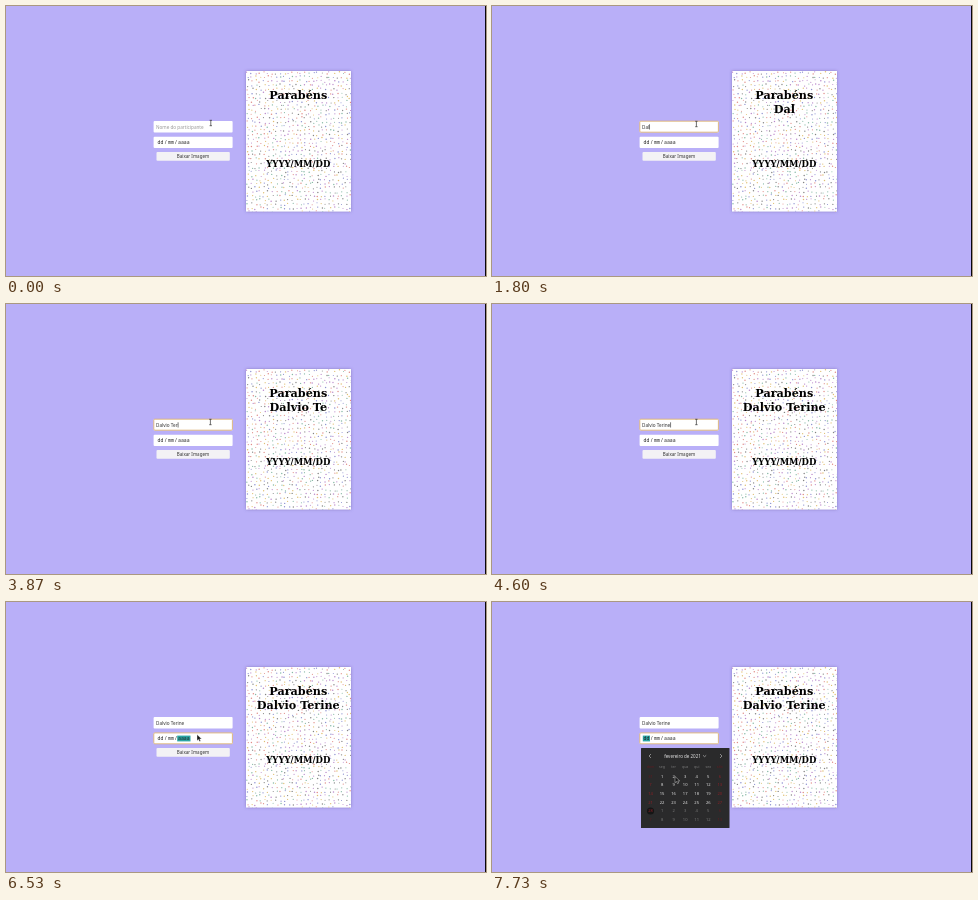
These frames come from a looping animation (480 by 270 pixels, 8000 ms). An HTML page:

```html
<!DOCTYPE html>
<html lang="pt-BR">
<head>
<meta charset="utf-8">
<title>Parabéns</title>
<style>
  html, body { margin: 0; width: 100%; height: 100%; overflow: hidden; background: #b9aff8; }
  svg { display: block; width: 480px; height: 270px; }
  text { font-family: "Noto Sans", "Open Sans", sans-serif; font-size: 4.65px; fill: #333; }
  .card text { font-family: "DejaVu Serif", serif; font-weight: bold; font-size: 11.2px; fill: #000; }
  .card .date { font-size: 8.5px; }
  .mid { text-anchor: middle; }
  .parts text { font-family: "Noto Sans Mono", monospace; font-size: 4.8px; fill: #222; }
  .focus { fill: none; stroke: #dbb274; stroke-width: .9; }
  .picker text { fill: #e4e4e4; font-size: 4.1px; }
  .picker .dim { fill: #777; }
  .picker .rest { fill: #8a2027; }
  .picker .faint { fill: #5c1c20; }
  .picker path { fill: none; stroke: #ccc; stroke-width: .6; }
</style>
</head>
<body>
<svg viewBox="0 0 480 270">
  <defs>
    <filter id="shade" x="-10%" y="-10%" width="120%" height="120%">
      <feDropShadow dx="0" dy="0" stdDeviation="1.8" flood-color="#554a90" flood-opacity=".5"/>
    </filter>
    <clipPath id="cardClip"><rect x="240" y="65" width="105" height="140.5"/></clipPath>
  </defs>
  <rect width="480" height="270" fill="#b9aff8"/>
  <rect x="479" width="1" height="270" fill="#08070c"/>

  <g class="card">
    <rect x="240" y="65" width="105" height="140.5" fill="#fff" filter="url(#shade)"/>
    <g id="confetti" clip-path="url(#cardClip)" opacity=".8"></g>
    <text class="mid" x="292.3" y="93">Parabéns</text>
    <text class="mid" x="292.3" y="107" id="cardName"></text>
    <text class="mid date" x="292.3" y="160.7">YYYY/MM/DD</text>
  </g>

  <rect x="147.6" y="115" width="79" height="11.4" rx="1" fill="#fff"/>
  <rect x="147.6" y="130.7" width="79" height="11.3" rx="1" fill="#fff"/>
  <rect x="150.5" y="146" width="73.3" height="8.7" rx="1" fill="#f3f2f5"/>
  <text class="mid" x="187" y="152.2" style="font-size:4.5px">Baixar Imagem</text>
  <rect class="focus" id="nameFocus" x="147.8" y="115.2" width="78.6" height="11" rx="1"/>
  <rect class="focus" id="dateFocus" x="147.8" y="130.9" width="78.6" height="10.9" rx="1"/>
  <text id="nameText" x="150" y="122.6"></text>
  <rect id="caret" y="118.3" width=".6" height="5.2" fill="#222"/>
  <rect id="segment" y="133.6" height="5.8" fill="#2aa5a3"/>
  <g class="parts">
    <text x="151.6" y="138.2">dd</text>
    <text x="158.2" y="138.2">/</text>
    <text x="162" y="138.2">mm</text>
    <text x="168.5" y="138.2">/</text>
    <text x="172.1" y="138.2">aaaa</text>
  </g>

  <g class="picker" id="picker">
    <rect x="149" y="146" width="88.5" height="80" rx=".6" fill="#2a2a2b"/>
    <text class="mid" x="190.5" y="155.5" style="font-size:4.5px">fevereiro de 2021</text>
    <path d="M159 152l-2 2 2 2M228 152l2 2-2 2M211 153.3l1.6 1.4 1.6-1.4"/>
    <circle cx="158.5" cy="209" r="3.6" fill="#151515"/>
  </g>

  <path id="beam" d="M-1.2-2.7h2.4M0-2.7v5.4M-1.2 2.7h2.4" fill="none" stroke="#333" stroke-width=".7"/>
  <path id="arrow" d="M0 0v6.2l1.5-1.3 1 2.2 1.2-.5-1-2.2h2z" fill="#111" stroke="#fff" stroke-width=".4"/>
</svg>
<script>
  const $ = id => document.getElementById(id);
  const NS = "http://www.w3.org/2000/svg";
  const LOOP = 8000, STEP = 200 / 3;
  const NAME = "Dalvio Terine";
  const KEY_TIMES = [1066, 1533, 1666, 2000, 2266, 2600, 3066, 3330, 3530, 3800, 4000, 4200, 4400];
  const CARD_LAG = 128;
  const FOCUS_NAME = 800, FOCUS_DATE = 5330, OPEN_PICKER = 6730;

  // time, x, y
  const POINTER = [
    [0, 204.8, 117], [400, 204.8, 117], [600, 204.4, 118], [4930, 204.4, 118],
    [5330, 179, 137], [5870, 179, 137], [6470, 191, 132.5],
    [6930, 191, 132.5], [7730, 183, 174.5]
  ];

  function add(parent, tag, attrs, text) {
    const el = document.createElementNS(NS, tag);
    for (const k in attrs) el.setAttribute(k, attrs[k]);
    if (text !== undefined) el.textContent = text;
    parent.append(el);
  }

  function drawConfetti() {
    let seed = 17;
    const rnd = () => (seed = (seed * 16807) % 2147483647) / 2147483647;
    const colors = ["#d8706a", "#d9b050", "#6aa890", "#6f74c4", "#a96bbd", "#666"];
    const gap = 4.1;
    for (let y = 65.5; y < 206; y += gap) {
      for (let x = 240.5; x < 346; x += gap) {
        add($("confetti"), "circle", {
          cx: (x + rnd() * 2.8).toFixed(2), cy: (y + rnd() * 2.8).toFixed(2),
          r: (.5 + rnd() * .25).toFixed(2), fill: colors[Math.floor(rnd() * 6)]
        });
      }
    }
  }

  function drawPicker() {
    const colX = i => 158.5 + i * 11.55;
    const weekend = i => i % 7 === 0 || i % 7 === 6;
    ["dom", "seg", "ter", "qua", "qui", "sex", "sáb"].forEach((d, i) =>
      add($("picker"), "text", {
        x: colX(i), y: 166.2, class: "mid " + (weekend(i) ? "faint" : "dim"), style: "font-size:3.6px"
      }, d));
    for (let i = 0; i < 42; i++) {
      const inside = i > 0 && i < 29;
      const day = i === 0 ? 31 : inside ? i : i - 28;
      const tone = weekend(i) ? (inside ? "rest" : "faint") : inside ? "" : "dim";
      add($("picker"), "text", {
        x: colX(i % 7), y: 175.5 + Math.floor(i / 7) * 8.7, class: "mid " + tone
      }, day);
    }
  }

  function pointerAt(t) {
    let i = 0;
    while (i < POINTER.length - 1 && POINTER[i + 1][0] <= t) i++;
    const a = POINTER[i], b = POINTER[i + 1];
    if (!b) return [a[1], a[2]];
    const p = (t - a[0]) / (b[0] - a[0]), e = p * p * (3 - 2 * p);
    return [a[1] + (b[1] - a[1]) * e, a[2] + (b[2] - a[2]) * e];
  }

  const show = (id, on) => { $(id).style.display = on ? "" : "none"; };
  const typed = t => NAME.slice(0, KEY_TIMES.filter(k => k <= t).length);

  function render(time) {
    const t = Math.floor((time % LOOP + 4) / STEP) * STEP;
    const value = typed(t), field = $("nameText");
    const inName = t >= FOCUS_NAME && t < FOCUS_DATE;
    const inDate = t >= FOCUS_DATE, open = t >= OPEN_PICKER;

    field.textContent = value || "Nome do participante";
    field.style.fill = value ? "#333" : "#999";
    $("cardName").textContent = typed(t - CARD_LAG);
    show("nameFocus", inName);
    show("caret", inName);
    $("caret").setAttribute("x", 150.2 + (value ? field.getComputedTextLength() : 0));

    show("dateFocus", inDate);
    show("segment", inDate);
    $("segment").setAttribute("x", open ? 150.8 : 171.2);
    $("segment").setAttribute("width", open ? 7.2 : 13.3);
    show("picker", open);

    const [x, y] = pointerAt(t);
    const overName = y < 126.5;
    show("beam", overName);
    show("arrow", !overName);
    $(overName ? "beam" : "arrow").setAttribute("transform", `translate(${x} ${y})`);
  }

  drawConfetti();
  drawPicker();
  const start = performance.now();
  function tick() {
    render(performance.now() - start);
    requestAnimationFrame(tick);
  }
  tick();
</script>
</body>
</html>
```
